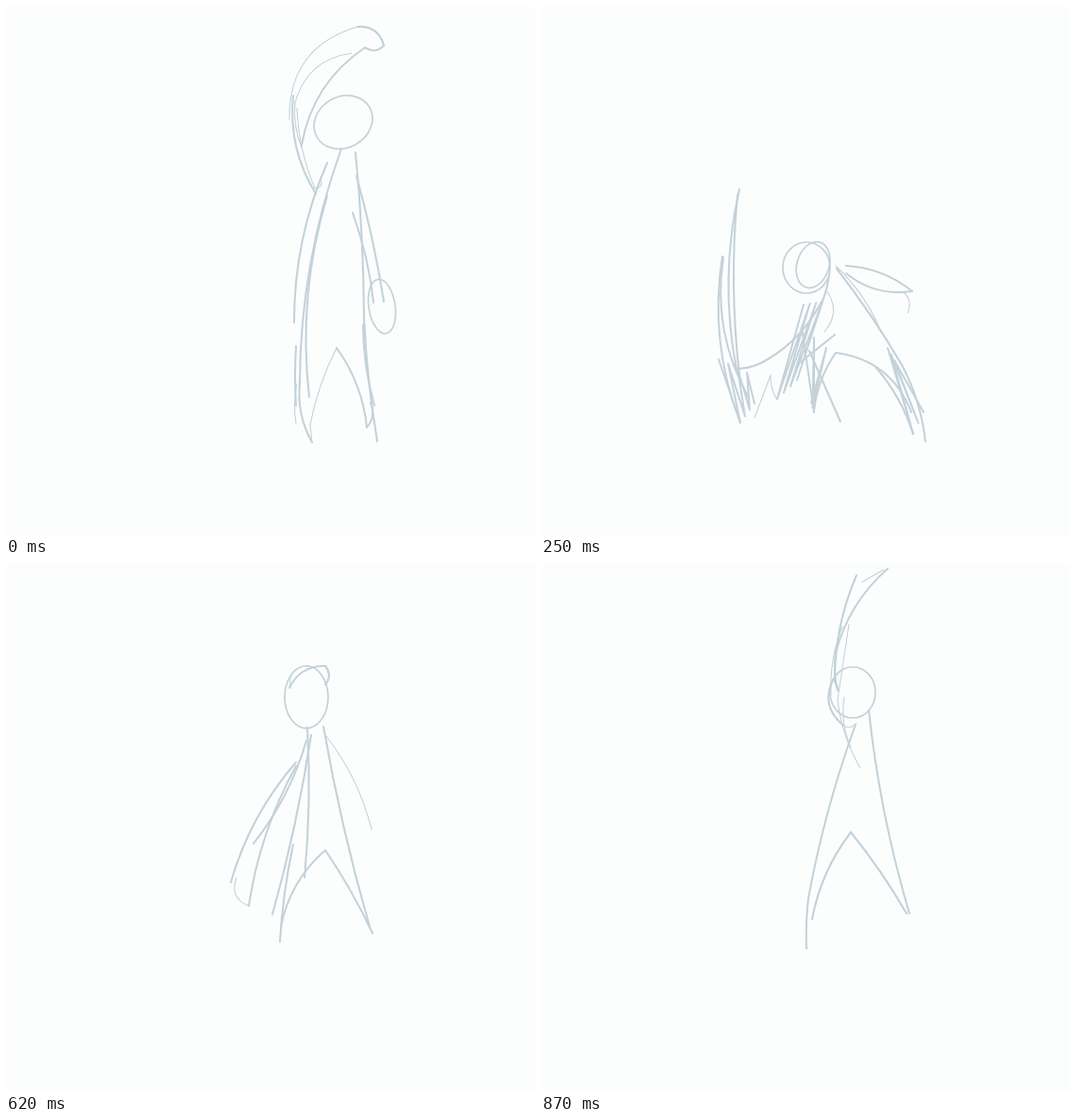
An HTML page with a canvas for the animation above (1000 ms loop, 560 px wide and 560 px high).

```html
<!DOCTYPE html>
<html lang="en">
<head>
<meta charset="utf-8">
<title>Sketch figure swing</title>
<style>
  html, body { margin: 0; height: 100%; overflow: hidden; background: #fcfefe; }
  canvas { display: block; width: 100vw; height: 100vh; }
</style>
</head>
<body>
<canvas width="560" height="560"></canvas>
<script>
const ctx = document.querySelector("canvas").getContext("2d");
ctx.strokeStyle = "#c4d2d9";
ctx.lineCap = ctx.lineJoin = "round";

function ink(width, trace) {
  ctx.lineWidth = width;
  ctx.beginPath();
  trace();
  ctx.stroke();
}

// A curve between two points; bow is how far its middle leaves the straight line.
function curve(width, x1, y1, x2, y2, bow = 0) {
  const dx = x2 - x1, dy = y2 - y1, k = 2 * bow / Math.hypot(dx, dy);
  ink(width, () => {
    ctx.moveTo(x1, y1);
    ctx.quadraticCurveTo((x1 + x2) / 2 + dy * k, (y1 + y2) / 2 - dx * k, x2, y2);
  });
}
const stroke = (...line) => curve(2.1, ...line);
const thin = (...line) => curve(1.1, ...line);

function oval(x, y, rx, ry, tilt = 0) {
  ink(1.7, () => ctx.ellipse(x, y, rx, ry, tilt, 0, 2 * Math.PI));
}

// Zigzag hatching from a top edge to a bottom edge.
function scribble(x1, y1, x2, y2, x3, y3, x4, y4, turns) {
  ink(2, () => {
    for (let i = 0; i <= turns; i++) {
      const t = i / turns;
      ctx.lineTo(x1 + (x2 - x1) * t, y1 + (y2 - y1) * t);
      ctx.lineTo(x3 + (x4 - x3) * t, y3 + (y4 - y3) * t);
    }
  });
}

function curled() {
  thin(300, 120, 372, 22, 23);
  stroke(372, 22, 400, 42, 7);
  stroke(400, 42, 380, 44, 4);
  stroke(380, 44, 313, 147, -13);
  thin(366, 50, 306, 102, -13);
  thin(306, 102, 313, 150, -3);
  stroke(304, 95, 328, 199, -9);
  thin(308, 108, 327, 193, -4);
  thin(327, 193, 334, 185, -3);
  oval(357, 123, 32, 27, -.5);
  stroke(355, 151, 311, 400, -11);
  stroke(311, 400, 324, 462, -5);
  stroke(340, 201, 321, 414, -11);
  stroke(340, 166, 305, 335, -9);
  stroke(307, 360, 307, 423, -1);
  thin(308, 400, 307, 442, -2);
  stroke(370, 155, 379, 330, 2);
  stroke(379, 330, 393, 461, -2);
  stroke(378, 337, 390, 423, -3);
  thin(324, 462, 322, 443);
  thin(322, 443, 350, 362, 3);
  stroke(350, 362, 382, 446, 6);
  stroke(382, 446, 386, 420, -4);
  stroke(371, 180, 400, 313, 2);
  stroke(367, 219, 389, 314, 3);
  oval(398, 318, 14, 29, -.15);
}

function reaching() {
  thin(329, 27, 269, 120, -17);
  thin(269, 120, 287, 152, -9);
  stroke(313, 44, 281, 115, -8);
  stroke(281, 115, 328, 211, -9);
  stroke(343, 20, 306, 135, -13);
  thin(297, 94, 302, 180, -7);
  thin(293, 140, 319, 203, -12);
  oval(332, 143, 23, 29);
  oval(344, 144, 23, 32);
  stroke(335, 187, 329, 417, -9);
  stroke(329, 254, 315, 450, -8);
  thin(319, 451, 342, 326, 2);
  stroke(346, 324, 399, 471, 1);
  stroke(362, 176, 397, 420, 1);
  stroke(359, 191, 397, 300, 2);
  thin(391, 415, 399, 471, -1);
  oval(394, 294, 10, 28, -.25);
}

function striking() {
  stroke(210, 194, 207, 385, -10);
  stroke(208, 200, 210, 390, -5);
  stroke(192, 265, 211, 441, -12);
  stroke(193, 266, 220, 415, -13);
  scribble(188, 374, 218, 388, 211, 441, 226, 421, 3);
  stroke(210, 384, 240, 374, -2);
  stroke(240, 374, 297, 313, -6);
  thin(226, 436, 243, 391);
  thin(243, 391, 250, 417, -2);
  scribble(278, 316, 298, 313, 250, 416, 271, 396, 3);
  scribble(276, 340, 302, 362, 289, 430, 286, 420, 2);
  stroke(284, 365, 317, 440);
  stroke(311, 348, 271, 380);
  oval(281, 277, 25, 27);
  oval(288, 274, 17, 25, .3);
  stroke(305, 285, 297, 315, 1);
  thin(303, 302, 300, 345, 8);
  stroke(323, 275, 393, 302, 6);
  stroke(393, 302, 323, 283, 8);
  thin(384, 303, 388, 325, 4);
  stroke(313, 278, 382, 380, 2);
  stroke(382, 380, 407, 461, 4);
  thin(312, 275, 358, 340, 4);
  stroke(289, 428, 312, 367, 4);
  stroke(312, 367, 392, 430, 15);
  scribble(367, 362, 374, 375, 394, 453, 405, 430, 2);
  stroke(355, 383, 394, 453, 4);
}

function crouched() {
  oval(297, 291, 28, 28);
  oval(290, 293, 19, 19);
  oval(285, 293, 24, 22, .2);
  stroke(299, 287, 386, 288, 11);
  stroke(299, 270, 355, 300, 8);
  thin(355, 292, 377, 317, 4);
  stroke(296, 316, 327, 343);
  thin(327, 343, 309, 303);
  stroke(323, 336, 342, 287, 1);
  stroke(342, 287, 347, 338, 3);
  stroke(284, 321, 208, 388, 10);
  stroke(201, 390, 214, 437, -4);
  thin(214, 437, 283, 322, -3);
  stroke(283, 322, 240, 378, 2);
  stroke(207, 400, 208, 414);
  thin(208, 388, 201, 390);
  stroke(341, 312, 403, 444, 6);
  stroke(346, 322, 375, 380);
  stroke(369, 350, 397, 430, 4);
  stroke(403, 444, 390, 425);
  stroke(319, 345, 279, 380, 1);
  stroke(279, 380, 287, 420);
  stroke(287, 420, 281, 386, -2);
  stroke(281, 386, 343, 359, 11);
  stroke(343, 359, 376, 404, 2);
}

function rising() {
  oval(305, 215, 23, 30);
  stroke(284, 202, 327, 194, 9);
  stroke(303, 246, 309, 338, 2);
  stroke(308, 249, 279, 370, 3);
  stroke(328, 241, 394, 413, 2);
  stroke(288, 411, 332, 329, 10);
  stroke(332, 329, 390, 409, 3);
  stroke(301, 259, 249, 338, 4);
  stroke(296, 272, 222, 365, -3);
  stroke(296, 280, 238, 399, -2);
  thin(222, 365, 238, 399, -5);
  thin(330, 245, 382, 290, 6);
}

function upright() {
  oval(318, 142, 23, 33);
  stroke(300, 132, 338, 109, 7);
  stroke(338, 109, 338, 129, 4);
  thin(301, 132, 322, 109, 9);
  stroke(319, 174, 316, 333, 3);
  stroke(323, 182, 282, 372, 3);
  stroke(336, 173, 385, 385, -3);
  stroke(304, 298, 290, 401, -2);
  stroke(291, 385, 338, 304, 8);
  stroke(338, 304, 388, 392, 2);
  thin(338, 182, 387, 282, 6);
  stroke(318, 188, 262, 297, 6);
  stroke(307, 211, 238, 338, -8);
  stroke(307, 215, 257, 363, -7);
  thin(257, 363, 244, 333, 8);
}

function lifting() {
  oval(323, 140, 24, 30);
  stroke(326, 172, 285, 404, -8);
  stroke(289, 388, 333, 295, 7);
  stroke(333, 295, 387, 381, 1);
  stroke(342, 166, 388, 381, -5);
  stroke(319, 199, 260, 105, 9);
  stroke(310, 178, 272, 92, 6);
  thin(260, 105, 272, 92, 4);
  thin(343, 175, 376, 258, 3);
}

function raised() {
  stroke(334, 13, 311, 125, -6);
  stroke(311, 125, 315, 135);
  stroke(367, 6, 312, 95, -8);
  stroke(312, 95, 314, 135, -2);
  thin(363, 7, 340, 20);
  thin(326, 65, 314, 145);
  thin(314, 145, 338, 217, -4);
  thin(319, 67, 307, 140, -4);
  oval(330, 137, 24, 27);
  stroke(311, 120, 320, 172, -11);
  thin(320, 172, 333, 170, -3);
  stroke(333, 171, 283, 355, -4);
  stroke(283, 355, 281, 408, -1);
  stroke(287, 377, 328, 285, 6);
  stroke(328, 285, 387, 371, 2);
  stroke(347, 156, 390, 371, -5);
  thin(321, 142, 328, 195, -4);
}

const LOOP = 1000;
const poses = [curled, reaching, striking, crouched, rising, upright, lifting, raised];
const starts = [0, 120, 250, 370, 500, 620, 750, 870];

function render() {
  const time = performance.now() % LOOP;
  ctx.clearRect(0, 0, 560, 560);
  poses[starts.findLastIndex(start => start <= time)]();
  requestAnimationFrame(render);
}
render();
</script>
</body>
</html>
```
